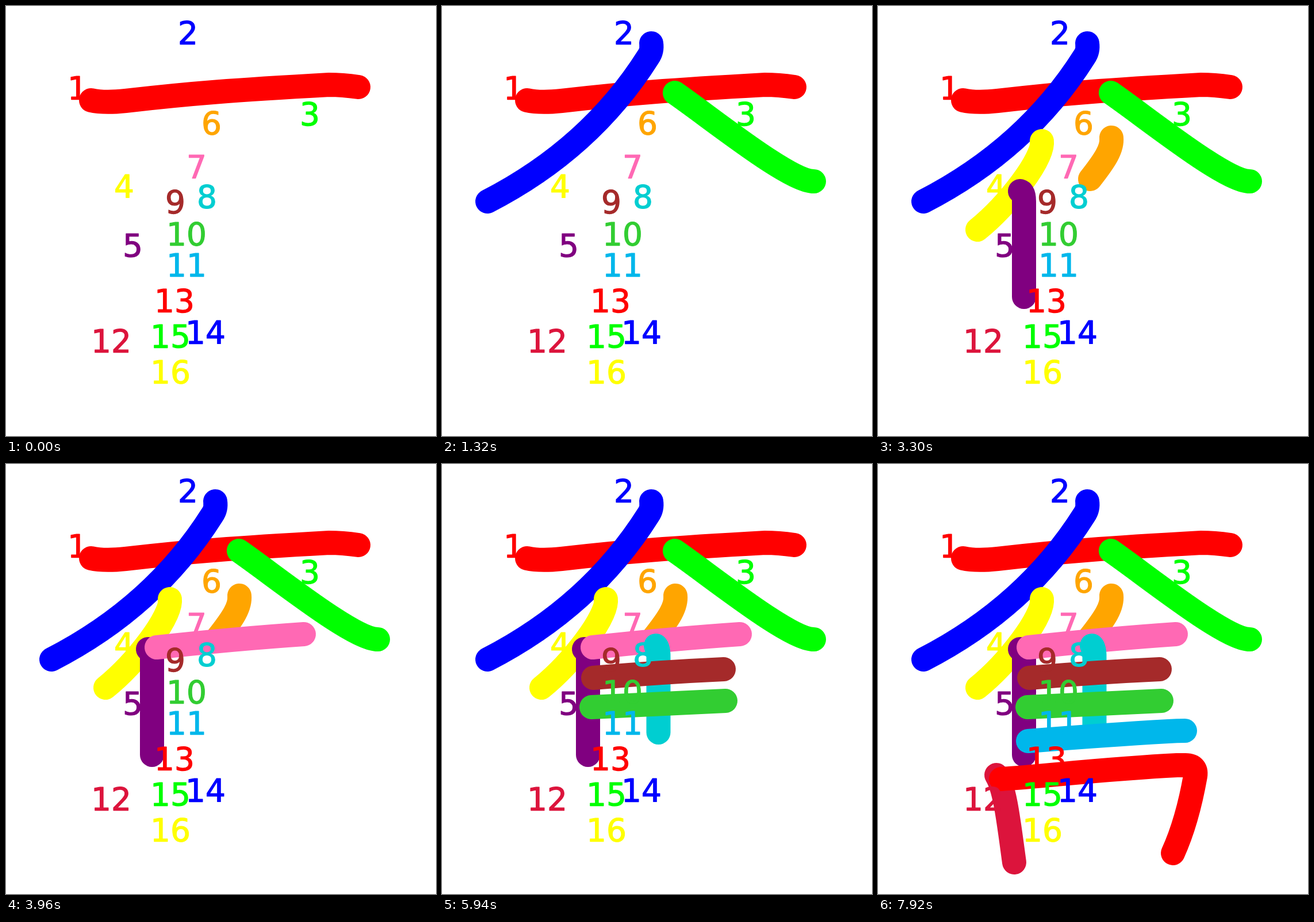
These frames come from a looping animation (748 by 748 pixels, 8 s). An HTML page with a canvas:

```html
<!DOCTYPE html>
<html lang="en">
<head>
<meta charset="utf-8">
<title>Stroke order</title>
<style>
html, body { margin: 0; width: 100%; height: 100%; overflow: hidden; background: #fff; }
canvas { display: block; width: 748px; height: 748px; }
</style>
</head>
<body>
<canvas id="stage" width="748" height="748"></canvas>
<script>
const ctx = document.getElementById('stage').getContext('2d');
const LOOP = 8000, STEP = 660;

// colour, label x, label baseline, stroke path
const strokes = [
  ['#f00', 107, 161.5, 'M148 164Q170 169 208 165C320 152 400 146 562 137Q585 137 613 141'],
  ['#00f', 299, 65.5, 'M364 65Q366 78 359 88Q258 248 79 340'],
  ['#0f0', 511, 206.5, 'M405 151C470 196 604 305 647 305'],
  ['#ff0', 188, 332.5, 'M285 235C289 265 225 347 173 389'],
  ['#800080', 203, 435.5, 'M247 322Q254 324 254 340V506'],
  ['#ffa500', 340, 222.5, 'M406 229C408 248 395 268 369 301'],
  ['#ff69b4', 314, 298.5, 'M262 319Q400 304 518 296'],
  ['#00ced1', 332, 350.5, 'M372 316Q377 320 376.5 337V467'],
  ['#a52a2a', 277, 359.5, 'M263 372Q380 362 490 357'],
  ['#32cd32', 279, 415.5, 'M260 423Q376 418 493 412'],
  ['#00b7eb', 279, 469.5, 'M261 482Q400 471 505 465Q520 464 534 464'],
  ['#dc143c', 148, 601.5, 'M206 541C221 565 227 620 237 693'],
  ['#f00', 258, 531.5, 'M214 548C300 542 400 530 520 524H535Q555 524 552 543Q538 622 513 677'],
  ['#00f', 312, 586.5],
  ['#0f0', 251, 593.5],
  ['#ff0', 251, 655.5]
].map(([color, x, y, d]) => ({ color, x, y, path: d && new Path2D(d) }));

ctx.lineCap = ctx.lineJoin = 'round';
ctx.font = '55px "DejaVu Sans", sans-serif';

function draw(time) {
  const count = Math.floor(time / STEP) + 1;
  ctx.fillStyle = '#fff';
  ctx.fillRect(0, 0, 748, 748);

  ctx.lineWidth = 42;
  for (const s of strokes.slice(0, count)) {
    if (!s.path) continue;
    ctx.strokeStyle = s.color;
    ctx.stroke(s.path);
  }

  // a thin outline gives the digits their weight
  ctx.lineWidth = 1.2;
  strokes.forEach((s, i) => {
    ctx.fillStyle = ctx.strokeStyle = s.color;
    ctx.fillText(i + 1, s.x, s.y);
    ctx.strokeText(i + 1, s.x, s.y);
  });
}

const start = performance.now();
function tick() {
  draw((performance.now() - start) % LOOP);
  requestAnimationFrame(tick);
}
tick();
</script>
</body>
</html>
```
